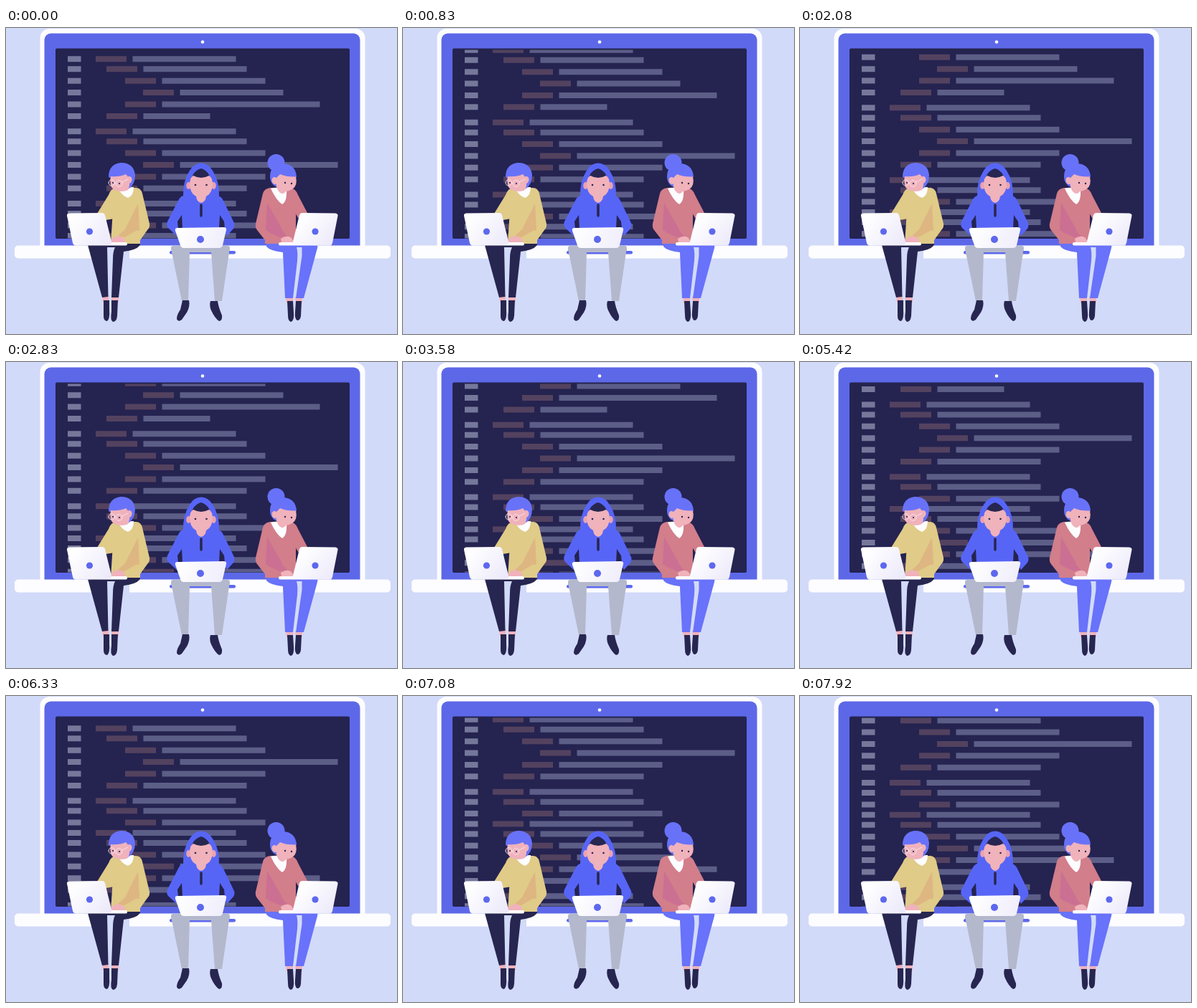
Animation, 545 px wide and 427 px high, one loop 8 s. Source, as an HTML page with a canvas:

```html
<!DOCTYPE html>
<html lang="en">
<head>
<meta charset="utf-8">
<title>Coders</title>
<style>
html, body { margin: 0; width: 100%; height: 100%; overflow: hidden; background: #d2daf9; }
canvas { display: block; width: 545px; height: 427px; }
</style>
</head>
<body>
<canvas id="stage"></canvas>
<script>
const W = 545, H = 427, LOOP = 8000;
const canvas = document.getElementById('stage');
const dpr = window.devicePixelRatio || 1;
canvas.width = W * dpr;
canvas.height = H * dpr;
const ctx = canvas.getContext('2d');

const C = {
  bg: '#d2daf9', white: '#fdfdff', bezel: '#5d68e8', blue: '#5765f6', jeans: '#6872fa',
  screen: '#252350', navy: '#272650', label: '#76789b', key: '#53425f', value: '#5c5e88',
  skin: '#f0b2bb', skinDark: '#e8a3b0', yellow: '#e0cb88', yellowDark: '#deb682',
  red: '#d27e8b', redDark: '#cb7093', hair: '#6872f8', pale: '#b3b8cc', logo: '#5d68ee'
};

function shape(color, d) {
  ctx.fillStyle = color;
  ctx.fill(new Path2D(d));
}

function line(color, width, d) {
  ctx.strokeStyle = color;
  ctx.lineWidth = width;
  ctx.lineCap = ctx.lineJoin = 'round';
  ctx.stroke(new Path2D(d));
}

function oval(color, x, y, rx, ry = rx, turn = 0) {
  ctx.fillStyle = color;
  ctx.beginPath();
  ctx.ellipse(x, y, rx, ry, turn, 0, Math.PI * 2);
  ctx.fill();
}

function box(color, x, y, w, h, r = 0) {
  ctx.fillStyle = color;
  ctx.beginPath();
  ctx.roundRect(x, y, w, h, r);
  ctx.fill();
}

function shade(x0, y0, x1, y1, from, to) {
  const g = ctx.createLinearGradient(x0, y0, x1, y1);
  g.addColorStop(0, from);
  g.addColorStop(1, to);
  return g;
}

// Code listing: indent level of each line and length of its value bar
const INDENT = [125, 140, 166, 191];
const LEVELS = [0, 1, 2, 3, 2, 1];
const code = [];
let nextY = 43.3;

function addBlock(lengths) {
  lengths.forEach((length, i) => {
    code.push({ y: nextY, x: INDENT[LEVELS[i]], length });
    const last = i === lengths.length - 1;
    nextY += last ? (i < 3 ? 14.4 : 21.3) : i === 0 ? 14 : 16.4;
  });
}
const longCall = [144, 144, 144, 144, 220, 93];
const longBody = [144, 144, 144, 220, 144, 144];
addBlock(longCall);
addBlock(longBody);
addBlock([144, 144, 144]);
addBlock(longCall);
addBlock(longBody);

function drawCode(shift) {
  ctx.save();
  ctx.beginPath();
  ctx.rect(69, 30.5, 410, 263);
  ctx.clip();
  for (const { y, x, length } of code) {
    const top = y - 4 - shift;
    if (top < 18 || top > 296) continue;
    box(C.label, 86, top, 18.5, 8);
    box(C.key, x, top, 43, 8);
    box(C.value, x + 51.5, top, length, 8);
  }
  ctx.restore();
}

function drawMonitor(shift) {
  box(C.white, 47.5, 1, 453, 320, 13);
  box(C.bezel, 53.5, 7.5, 440, 310, 9);
  box(C.screen, 69, 28.5, 410, 265.5, 2);
  oval(C.white, 274, 19.5, 2.3);
  drawCode(shift);
}

function drawShelf() {
  box(C.white, 12, 303.5, 524, 18, 5);
  box(C.bg, 128, 304, 44, 18);
  box(C.bg, 386, 304, 39, 18);
  box(C.pale, 230, 304, 82, 8, 3);
  box(C.logo, 228, 311, 92, 4.5, 2.2);
}

function drawLeft() {
  // legs and shoes
  shape(C.skin, 'M134 373H143V383H135ZM147 373H157V383H147Z');
  shape(C.navy, 'M114 303Q113 299 120 299H180Q190 299 186 304Q181 310 164 312L157 376H147L149 322Q149 312 152 306H141L142.5 375L134 376Z');
  shape(C.navy, 'M136 380H144V393Q145 406 141 409Q136 409 136 402ZM147 380H156L155 402Q154 410 149 410Q145 408 147 396Z');
  // sweater
  shape(C.yellow, 'M153 223Q146 224 143 233L127 259L139 268L151 266Z');
  shape(C.yellow, 'M151 223H181Q188 223 190 231L200 273Q201 278 197 282L187 296V301H146Z');
  shape(C.yellowDark, 'M184 245L166 281L186 283Z');
  shape(C.yellowDark, 'M166 281L186 276L181 283L165 292L155 291Z');
  // collar and head
  shape(C.white, 'M156 223L178 222Q178 234 170 237Q161 234 156 223Z');
  shape(C.hair, 'M143 208Q143 190 160 188Q178 188 180 205Q180 219 170 225L158 216Z');
  shape(C.skin, 'M146 207Q158 208 167 204L172 210Q173 221 170 226Q162 230 151 226Q143 221 146 207Z');
  oval(C.skin, 171.5, 212, 4, 5, .2);
  oval(C.navy, 149, 216, 1.1);
  oval(C.navy, 158, 217, 1.1);
  line('#f6e8f2', .9, 'M143 216a4.3 4.3 0 1 0 8.6 0a4.3 4.3 0 1 0 -8.6 0M153 217a4.5 4.5 0 1 0 9 0a4.5 4.5 0 1 0 -9 0M162 215L170 211');
  // laptop and hand
  shape(C.skin, 'M145 299Q148 291 157 290L166 294L166 300Z');
  box(C.white, 95, 299, 74, 4.5, 2);
  shape(shade(95, 262, 147, 302, '#ffffff', '#ebe8fa'),
    'M88 258.5L134 258Q137 258 138 261L147 298Q148 302 144 302.5L98 303.5Q94 303.5 93 300L85 262Q84.5 259 88 258.5Z');
  oval(C.logo, 116.5, 284, 4.6);
}

function drawMiddle() {
  // legs and shoes
  shape(C.pale, 'M231 313Q229 304 240 303H301Q313 303 311 313L301 381H291L286 313H256L254 381H245Z');
  shape(C.navy, 'M246 380H255Q257 388 252 397L245 407Q240 411 238 406Q238 400 243 393Z');
  shape(C.navy, 'M285 381H295Q296 389 301 401Q302 408 297 409Q291 405 286 394Q283 387 285 381Z');
  // hoodie
  shape(C.blue, 'M250 233Q243 234 240 241L225 270Q223 275 226 279L239 291L243 280H302L308 290L317 280Q320 275 317 270L303 241Q300 234 292 233Z');
  shape(C.screen, 'M239 270L245 261L246 280H240ZM304 270L298 261L297 280H305Z');
  shape(C.blue, 'M247 236Q246 214 256 199Q262 188.5 272 188.5Q282 188.5 288 199Q298 214 297 236Q284 241 278 242H264Q253 240 247 236Z');
  // head
  shape(C.navy, 'M257 222Q257 200 272 196Q286 200 287 222Z');
  oval(C.skinDark, 254.5, 220, 3.3, 5);
  oval(C.skinDark, 289.5, 220, 3.3, 5);
  shape(C.skin, 'M256 216Q257 208 261 206Q272 212 283 206Q287 208 288 216Q288 231 279 235Q278 243 272 244Q266 243 265 235Q256 231 256 216Z');
  oval(C.navy, 264, 219, 1.3);
  oval(C.navy, 279.5, 219, 1.3);
  line(C.navy, 3.5, 'M272 247V262');
  // laptop
  shape(shade(240, 280, 304, 306, '#ffffff', '#efedfb'),
    'M239 279L303 278Q308 278 307 282L302 303Q301 307 297 307H248Q244 307 243 303L236 283Q235 279 239 279Z');
  oval(C.logo, 271, 295, 5);
}

function drawRight() {
  // legs and shoes
  shape(C.skin, 'M390 375H400V384H391ZM403 375H413V384H404Z');
  shape(C.jeans, 'M363 299H428Q436 300 434 307L415 377H404L412.5 318V306H405Q407 312 406 325L400 377H389L386 313Q368 311 363 305Z');
  shape(C.navy, 'M392 381H400L401 397Q402 409 397 410Q393 409 393 401ZM404 381H412L411 402Q410 408 406 408Q402 406 403 396Z');
  // sweater
  shape(C.red, 'M396 223Q404 224 407 233L420 258L409 268L397 248Z');
  shape(C.red, 'M368 223H399L404 260V301H361V296L350 282Q347 278 348 273L358 231Q360 224 368 223Z');
  shape(C.redDark, 'M364 244L385 281L362 283Z');
  shape(C.redDark, 'M362 276L384 281L392 291L382 292L366 285Z');
  // collar and head
  oval(C.hair, 376.5, 188, 12);
  shape(C.white, 'M369 224Q376 221 391 225Q392 242 385 246Q377 241 369 224Z');
  shape(C.hair, 'M368 207Q368 191 386 189Q404 190 405 208L390 216L380 223Q368 219 368 207Z');
  shape(C.skin, 'M376 210L382 204Q391 208 404 207.5Q407 220 399 225Q393 228 390 228Q387 233 382 230Q376 226 376 210Z');
  oval(C.skin, 374.5, 213, 4, 5, -.2);
  oval(C.navy, 389, 216, 1.2);
  oval(C.navy, 398, 217, 1.2);
  // laptop and hand
  shape(C.skin, 'M384 299L383 294Q392 288 398 293L402 300Z');
  box(C.white, 380, 299, 74, 4.5, 2);
  shape(shade(415, 262, 460, 302, '#ffffff', '#ebe8fa'),
    'M413 258L459 258.5Q463 259 462.5 262L455 300Q454 303.5 450 303.5L403 302.5Q399 302 400 298L409 261Q410 258 413 258Z');
  oval(C.logo, 431, 284, 4.6);
}

// Scroll moves ten times a second, shown at twelve pictures a second
function scrollAt(t) {
  const tick = Math.floor((t + 5) * 12 / 1000);
  return 1.57 * Math.ceil(tick * 10 / 12 - 0.5);
}

const start = performance.now();

function draw(now) {
  const t = Math.max(0, now - start) % LOOP;
  ctx.setTransform(dpr, 0, 0, dpr, 0, 0);
  box(C.bg, 0, 0, W, H);
  drawMonitor(scrollAt(t));
  drawShelf();
  drawLeft();
  drawMiddle();
  drawRight();
  requestAnimationFrame(draw);
}
draw(start);
</script>
</body>
</html>
```
